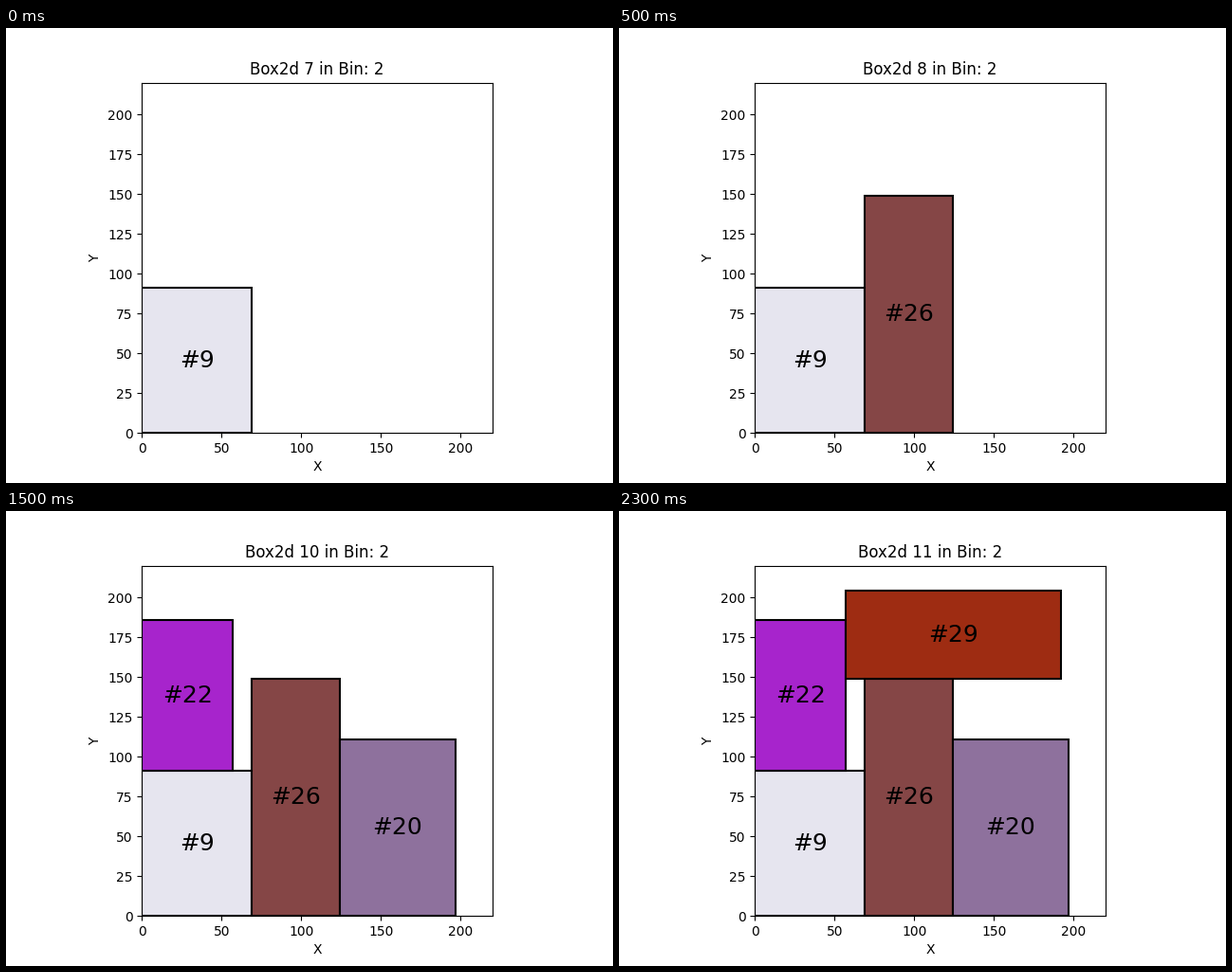
A matplotlib script that plays this animation: 640x480 px, repeating every 2.5 s.

```python
import matplotlib.pyplot as plt
from matplotlib.animation import FuncAnimation
from matplotlib.patches import Rectangle

SIZE = 220
FIRST = 7
BIN = 2

# label, x, y, width, height, colour
BOXES = [
    (9, 0, 0, 69, 91, "#e6e5ef"),
    (26, 69, 0, 55, 149, "#854646"),
    (20, 124, 0, 73, 111, "#8e719d"),
    (22, 0, 91, 57, 95, "#a724cc"),
    (29, 57, 149, 135, 55, "#9e2c12"),
]

fig, ax = plt.subplots(figsize=(6.4, 4.8), dpi=100)
ax.set_xlim(0, SIZE)
ax.set_ylim(0, SIZE)
ax.set_aspect("equal")
ax.set_xticks(range(0, SIZE, 50))
ax.set_yticks(range(0, SIZE, 25))
ax.set_xlabel("X")
ax.set_ylabel("Y")
title = ax.set_title("")


def add_box(label, x, y, w, h, color):
    rect = ax.add_patch(Rectangle((x, y), w, h, facecolor=color,
                                  edgecolor="black", linewidth=1.5))
    text = ax.text(x + w / 2, y + h / 2, f"#{label}", fontsize=18,
                   ha="center", va="center")
    return rect, text


placed = [add_box(*box) for box in BOXES]


def update(step):
    title.set_text(f"Box2d {FIRST + step} in Bin: {BIN}")
    for i, parts in enumerate(placed):
        for part in parts:
            part.set_visible(i <= step)
    return []


anim = FuncAnimation(fig, update, frames=len(BOXES), interval=500,
                     init_func=lambda: update(0), repeat=True, repeat_delay=0)
plt.show()
```
